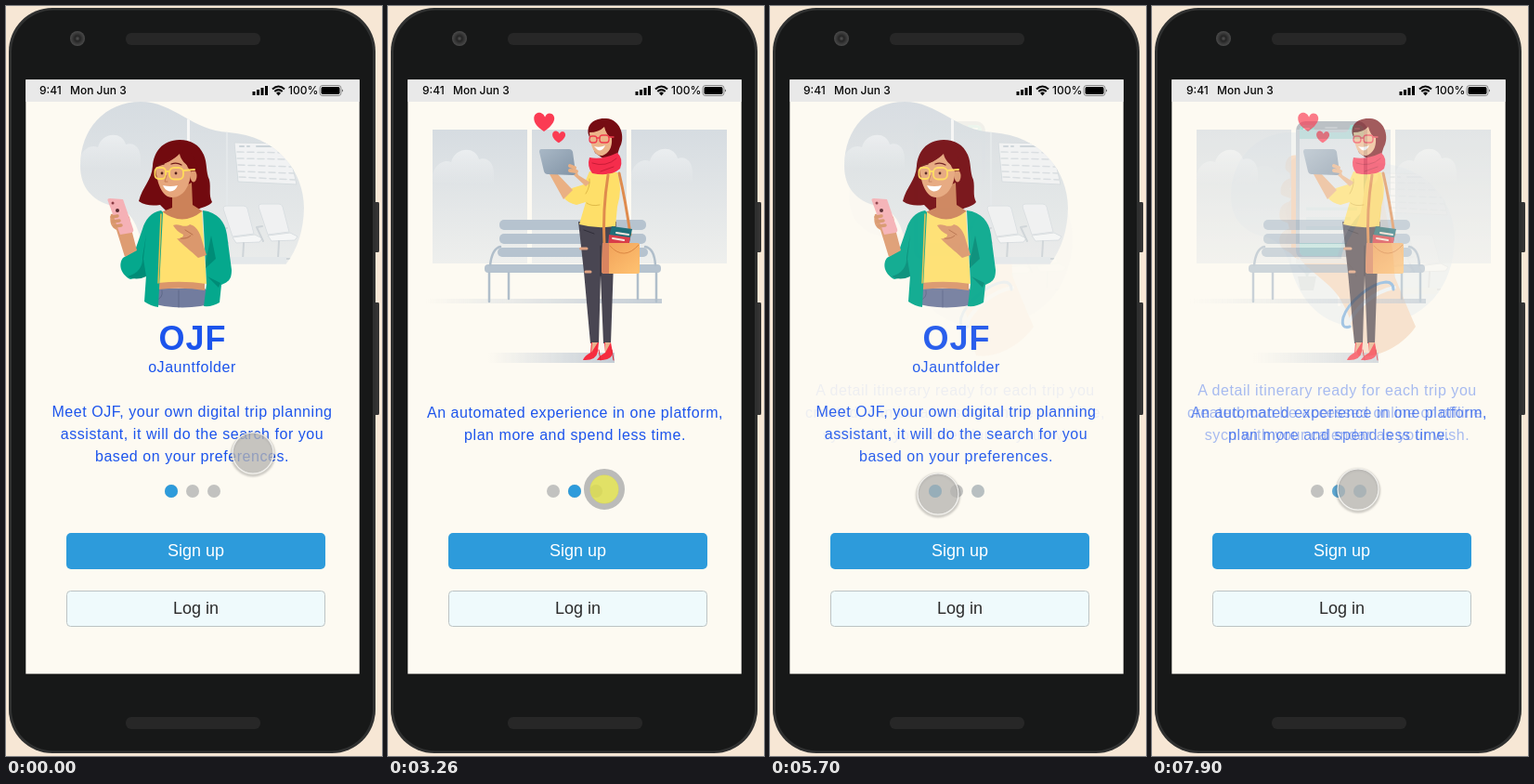
These frames come from a looping animation (405x807 px, 8 s). An HTML page:

```html
<!DOCTYPE html>
<html lang="en">
<head>
<meta charset="utf-8">
<title>Trip planner onboarding</title>
<style>
html, body { margin: 0; width: 100%; height: 100%; overflow: hidden; background: #f7e7d5; }
svg { display: block; width: 100%; height: 100%; }
text { font-family: "Liberation Sans", Arial, sans-serif; }
.copy { font-size: 16px; letter-spacing: .55px; fill: #1c54ec; text-anchor: middle; }
.title { font-size: 36px; font-weight: 700; letter-spacing: 1px; }
.label { font-size: 18px; text-anchor: middle; }
.status text { font: 500 12px Inter, "Liberation Sans", sans-serif; fill: #080808; }
.line { fill: none; stroke-linecap: round; stroke-linejoin: round; }
#two, #three, #press { opacity: 0; }
.shade { fill: none; stroke: rgba(0,0,0,.25); stroke-width: 2.5px; filter: blur(1px); }
</style>
</head>
<body>
<svg viewBox="0 0 405 807" preserveAspectRatio="none">
<defs>
  <linearGradient id="sky" x2="0" y2="1">
    <stop stop-color="#d6dce1"/><stop offset="1" stop-color="#eeefed"/>
  </linearGradient>
  <linearGradient id="cloud" x2="0" y2="1">
    <stop stop-color="#ebeef0"/><stop offset="1" stop-color="#eceeef" stop-opacity="0"/>
  </linearGradient>
  <linearGradient id="floor">
    <stop stop-color="#c9d1d9" stop-opacity="0"/><stop offset="1" stop-color="#c3ccd5"/>
  </linearGradient>
  <linearGradient id="bag" x2="1" y2="1">
    <stop stop-color="#f0a058"/><stop offset="1" stop-color="#ffc271"/>
  </linearGradient>
  <linearGradient id="slate" x2="1" y2="1">
    <stop stop-color="#a9b8c6"/><stop offset="1" stop-color="#8294a6"/>
  </linearGradient>
  <path id="blob" d="M80 172C80 132 107 103 145 103C181 103 200 134 240 136C292 140 321 178 321 217C320 270 290 307 230 313C185 315 160 292 147 257C141 235 135 219 115 215C93 210 80 195 80 172Z"/>
  <clipPath id="blobClip"><use href="#blob"/></clipPath>
  <clipPath id="above"><path d="M70 95H330V278H70Z"/></clipPath>
  <path id="puff" d="M0 40C-2 24 10 14 20 18C24 2 46 0 50 15C60 12 66 20 66 30L66 42Z"/>
  <path id="heart" d="M0 9C-15 0-10-11-3-9Q0-8 1-5Q3-10 8-8C13-4 9 3 0 9Z" fill="#fb3b53"/>
  <g id="chair">
    <path d="M0 3Q0 0 3 0L22 0Q25 0 26 3L33 30L10 33Z" fill="#f0f1f2" stroke="#dadfe2"/>
    <path d="M10 34L34 31L42 35L39 39L14 40Z" fill="#f5f6f6" stroke="#d8dde0"/>
    <path class="line" d="M4 24L-2 25L5 40M22 40L21 59M16 59H36" stroke="#ced4d8" stroke-width="2"/>
  </g>
  <g id="hall" clip-path="url(#blobClip)">
    <use href="#puff" x="79" y="134" fill="url(#cloud)"/>
    <path d="M195 100H198V290H195Z" fill="#f7f7f6"/>
    <path d="M237 100H239V250H237Z" fill="#e4e8ea"/>
    <path d="M246 147L303 148L313 192L250 189Z" fill="#f1f2f3"/>
    <path class="line" d="M249 157L305 158M249 164L307 165M250 171L308 173M250 178L310 180M251 184L311 187" stroke="#d8dde0" stroke-width="1.500" stroke-dasharray="7 4"/>
    <path class="line" d="M252 151H256M260 151H262M270 151H288" stroke="#ccd4d9" stroke-width="2"/>
    <path d="M246 147L303 148L313 192L250 189Z" fill="none" stroke="#d6dcdf"/>
    <use href="#chair" x="234" y="215"/>
    <use href="#chair" x="272" y="213"/>
    <path d="M236 270H302V277H236Z" fill="#e4e8ea"/>
  </g>
  <radialGradient id="lens"><stop stop-color="#555"/><stop offset=".35" stop-color="#242424"/><stop offset="1" stop-color="#4b4b4b"/></radialGradient>
</defs>

<!-- phone -->
<rect width="405" height="807" fill="#f7e7d5"/>
<path d="M396 211h5q1 0 1 2v50q0 2-1 2h-5zM396 319h5q1 0 1 2v117q0 2-1 2h-5z" fill="#333"/>
<rect x="3" y="2" width="395" height="802" rx="47" fill="#2f3030"/>
<rect x="6" y="4.500" width="389" height="797" rx="45" fill="#171818"/>
<g fill="#272727"><rect x="129" y="29" width="145" height="13" rx="6"/><rect x="129" y="765" width="145" height="13" rx="6"/></g>
<circle cx="77" cy="35" r="8" fill="url(#lens)"/>
<rect x="21.300" y="79.300" width="359.400" height="639.300" fill="#fdfaf2"/>
<rect x="21.300" y="79.300" width="359.400" height="23.700" fill="#e9e9e9"/>

<g class="status" id="status">
  <text x="36" y="95">9:41</text><text x="69" y="95">Mon Jun 3</text><text x="304" y="95">100%</text>
  <path d="M265.500 92h3v4h-3zM270 90h3v6h-3zM274.500 88h3v8h-3zM279 86h3v10h-3z"/>
  <g class="line" stroke="#080808" stroke-width="2.1" style="stroke-linecap:butt"><path d="M287 89.500Q293.500 83.500 300 89.500M289.300 92Q293.500 88.300 297.700 92"/></g>
  <path d="M291 93.700Q293.500 91.500 296 93.700L293.500 96.500Z"/>
  <rect x="338" y="85.500" width="23" height="11" rx="3" fill="none" stroke="#888"/>
  <rect x="339.500" y="87" width="20" height="8" rx="1.700"/><path d="M362 89.500q1.500 1.500 0 3z"/>
</g>

<!-- itinerary -->
<g id="three">
  <g transform="translate(5 33)"><use href="#blob" fill="#e1e9ef"/><use href="#hall"/></g>
  <path d="M157 291H177L174 306H160Z" fill="#cbd4da"/>
  <path class="line" d="M167 290V277M167 288L159 280M167 288L175 281" stroke="#c6d4da" stroke-width="3"/>
  <path class="line" d="M155 165Q148 164 148 174L156 180M154 189Q143 190 143 200L157 205M153 214Q140 215 142 227L155 232M152 243Q138 246 143 257L160 267" stroke="#edb68b" stroke-width="9"/>
  <path d="M148 168L158 160V273Q146 267 143 253L148 240L143 220L150 207Z" fill="#e8ab80"/>
  <rect x="155" y="124" width="77" height="149" rx="10" fill="#53667f"/>
  <rect x="159" y="128" width="69" height="141" rx="6" fill="#fcfcff"/>
  <path d="M159 143V134Q159 128 165 128H222Q228 128 228 134V143ZM159 255H228V263Q228 269 222 269H165Q159 269 159 263Z" fill="#06bda8"/>
  <path d="M173 127H214Q212 136 207 136H180Q175 136 173 127Z" fill="#53667f"/>
  <path class="line" d="M187 131H199" stroke="#8798ab" stroke-width="1.500"/>
  <path class="line" d="M164 132H169M219 132H223" stroke="#d9fffa" stroke-width="2"/>
  <path d="M166 216.500H221V220H166ZM166 227H214V230.500H166ZM166 237H221V241H166Z" fill="#cdebed"/>
  <path d="M226 222Q209 237 199 272H219Z" fill="#385c72" opacity=".55"/>
  <path d="M232 184C234 173 247 173 248 190C248 218 261 250 261 290Q273 320 284 345C270 366 242 380 222 376C216 358 218 343 207 323C196 299 176 292 159 272H204C205 256 220 245 225 221C229 205 227 196 232 184Z" fill="#efbd94"/>
  <path d="M234 179Q240 172 243 179Q245 187 239 192Q233 191 234 179Z" fill="#f8d8bf"/>
  <path class="line" d="M247 216Q245 239 232 254M205 272Q218 281 220 291" stroke="#d79a70"/>
  <path class="line" d="M210 346C217 325 240 307 261 303" stroke="#dce9f5" stroke-width="4"/>
  <path class="line" d="M213 345Q203 348 206 335C211 319 236 298 252 297Q260 297 260 305" stroke="#1470cb" stroke-width="3"/>
  <g class="copy">
    <text x="199.500" y="419">A detail itinerary ready for each trip you</text>
    <text x="199.500" y="443">created, can be accessed online or offline,</text>
    <text x="199.500" y="467">sycn with your calendar as your wish.</text>
  </g>
</g>

<!-- platform -->
<g id="two">
  <path d="M48 133H150V277H48ZM155 133H257V277H155ZM262 133H365V277H262Z" fill="url(#sky)"/>
  <use href="#puff" x="48" y="150" fill="url(#cloud)"/><use href="#puff" x="262" y="149" fill="url(#cloud)"/>
  <path d="M40 315H295V320H40Z" fill="url(#floor)"/><path d="M108 373H244V384H108Z" fill="url(#floor)"/>
  <g fill="#b6c3cf">
    <rect x="120" y="230" width="158" height="11" rx="5"/><rect x="120" y="245" width="158" height="11" rx="5"/>
    <rect x="118" y="260" width="162" height="10" rx="5"/><rect x="104" y="278" width="190" height="9" rx="4"/>
  </g>
  <path class="line" d="M110 279Q112 261 121 259M288 279Q287 261 277 259M109 287V318M130 287V315M269 287V315M289 287V318" stroke="#b0beca" stroke-width="2.500"/>
  <use href="#heart" transform="translate(168 125) scale(1.100)"/><use href="#heart" transform="translate(184 141) scale(.7)"/>
  <path d="M205 232H246L243 276L240 363H232L229 290L227 363H218L211 286Z" fill="#494652"/>
  <path class="line" d="M229 290L229 258M222 245L211 241" stroke="#302e39"/>
  <path class="line" d="M207.500 261H214M213 286H218" stroke="#dfa282" stroke-width="3"/>
  <path d="M219 362H227L226 372Q224 382 210 381Q212 376 218 373ZM233 362H240L242 373Q241 382 225 381Q228 376 234 373Z" fill="#f62c3f"/>
  <path d="M220 362H226L219 373ZM234 362H240L234 373Z" fill="#e9b18d"/>
  <path class="line" d="M227 370L229 381M241 370L243 381" stroke="#d92535"/>
  <path d="M217 178L247 179Q253 196 247 216L245 237Q224 240 206 235L213 211L203 214Q194 212 190 207L198 196L211 192Z" fill="#fedf69"/>
  <path d="M189 208L174 181L180 178L199 198ZM213 194L199 181L196 170L201 172L205 182L218 190Z" fill="#eab083"/>
  <path d="M165 154L195 154Q198 154 199 157L202 179Q202 182 199 182L172 181Q169 181 168 178L163 157Q163 154 165 154Z" fill="url(#slate)"/>
  <path class="line" d="M196 172L201 174M196 177L203 178" stroke="#eab083" stroke-width="4"/>
  <path class="line" d="M213 202Q218 194 217 186M214 212Q219 216 228 214" stroke="#e0ba48"/>
  <path d="M235 121C220 120 212 130 217 141L223 158L239 169C248 166 247 156 251 149C255 139 250 122 235 121Z" fill="#760c13"/>
  <path d="M217 136Q227 136 233 130Q235 139 241 142Q242 157 231 161Q219 162 217 136Z" fill="#ecb489"/>
  <g class="line" stroke="#f13b4c" stroke-width="1.300"><rect x="217" y="140" width="8" height="7" rx="3"/><rect x="228" y="139" width="10" height="8" rx="3"/><path d="M225 142H228M238 141H243"/></g>
  <path d="M222 151Q228 153 234 150Q231 157 226 155Z" fill="#fff"/>
  <path d="M217 163Q230 166 247 158Q254 164 250 175Q240 184 220 180Q214 173 217 163Z" fill="#f52d4c"/>
  <path class="line" d="M220 169Q235 174 246 164M229 178L243 173" stroke="#c91c37"/>
  <path class="line" d="M237 182Q231 220 233 256M249 180Q256 210 261 246" stroke="#df8b4d" stroke-width="3"/>
  <path d="M241 237L263 240L259 259L236 256Z" fill="#1f6f79"/><path d="M238 246L261 249L259 260L237 259Z" fill="#d93d49"/>
  <path class="line" d="M246 244L259 246M242 250L254 252" stroke="#f6e5dd" stroke-width="2"/>
  <path d="M231 255H269Q271 255 271 258V286Q271 288 268 288H233Q230 288 230 285Z" fill="url(#bag)"/>
  <path d="M231 255H238V288H233Q230 288 230 285Z" fill="#d98460"/>
  <path class="line" d="M239 258Q254 275 270 257" stroke="#db8743"/>
  <g class="copy">
    <text x="201.500" y="443">An automated experience in one platform,</text>
    <text x="201.500" y="467">plan more and spend less time.</text>
  </g>
</g>

<!-- welcome -->
<g id="one">
  <g clip-path="url(#above)"><use href="#blob" fill="url(#sky)"/><use href="#hall"/></g>
  <path d="M187 144C168 144 159 158 158 172C157 188 147 194 143 210C150 215 158 215 166 214L172 220L205 220C211 216 218 216 222 211C218 203 221 196 219 187C215 178 217 169 213 160C208 149 199 144 187 144Z" fill="#720a0f"/>
  <path d="M179 200L200 190L201 214L212 221L190 238L167 222L179 217Z" fill="#cc8259"/>
  <path d="M161 304H214L230 318Q190 331 150 318Z" fill="#727c9e"/>
  <path class="line" d="M186 306V324M168 306Q170 315 160 317" stroke="#5e6889"/>
  <path d="M165 296H214V306Q190 302 164 305Z" fill="#da966b"/>
  <path d="M168 221Q190 238 211 221L216 299Q190 295 164 298Z" fill="#ffe06f"/>
  <path d="M167 220C156 222 150 230 147 240L139 263L126 271C120 279 125 290 134 294L151 290L149 318Q156 323 164 324L169 222Z" fill="#05a88d"/>
  <path d="M212 220C228 222 236 232 238 246L243 284C243 296 238 297 232 300L230 319Q222 324 213 323L216 299Z" fill="#05a88d"/>
  <path d="M151 246L148 272L151 291Q140 296 131 291Q148 286 147 270ZM221 247L226 272L215 282L215 276ZM231 298L217 291L229 303Z" fill="#008c77"/>
  <path class="line" d="M167 224L164 298" stroke="#e2bd4c" stroke-width="1.500"/>
  <path d="M113 224C111 232 113 238 119 241L128 270L141 263L135 240L133 227L125 222Z" fill="#de9c72"/>
  <path d="M109.500 209Q109 207 112 207L126 208L137 240Q138 243 135 244L123 246Z" fill="#f5b1b6"/>
  <circle cx="120" cy="220" r="2" fill="#57272e"/><circle cx="115" cy="212" r="1.500" fill="#8b3c45"/>
  <path class="line" d="M114 227L120 226M115 232L122 231M117 237L124 236" stroke="#d8966c" stroke-width="3.500"/>
  <path d="M180 236C186 233 192 240 198 235C204 236 209 243 211 252L216 268L207 271C200 264 190 257 184 250C188 251 191 249 191 246Q184 243 180 236Z" fill="#db986d"/>
  <path class="line" d="M188 250Q195 251 199 247M193 241L201 246" stroke="#b8714b"/>
  <path d="M161 172C162 190 168 206 179 206C191 206 199 194 200 174C193 171 188 165 187 159C180 166 171 170 161 172Z" fill="#e6a67c"/>
  <ellipse cx="202" cy="183" rx="3.500" ry="6.500" fill="#e09d73"/>
  <path d="M190 155Q179 168 158 175Q161 155 178 148Q200 146 207 177L199 178Q193 172 190 155Z" fill="#720a0f"/>
  <g class="line" stroke="#ffda5c" stroke-width="1.900"><rect x="160.500" y="174" width="11.500" height="12" rx="4"/><rect x="176" y="174" width="15" height="12.500" rx="5"/><path d="M172 178H176M191 177L203 176"/></g>
  <circle cx="168" cy="180" r="1.400" fill="#512019"/><circle cx="183" cy="180" r="1.400" fill="#512019"/>
  <path class="line" d="M163 171L170 170M178 170Q184 168 189 171" stroke="#6b1717" stroke-width="1.300"/>
  <path class="line" d="M173 182L171 189H174" stroke="#c67c57"/>
  <path d="M169 193Q177 195 185 193Q182 200 176 199.500Q171 198 169 193Z" fill="#fff"/>
  <g class="copy">
    <text class="title" x="201" y="370">OJF</text><text x="200.500" y="394">oJauntfolder</text>
    <text x="200.500" y="442">Meet OJF, your own digital trip planning</text>
    <text x="200.500" y="466">assistant, it will do the search for you</text>
    <text x="200.500" y="490">based on your preferences.</text>
  </g>
</g>

<g id="dots"></g>

<rect x="65" y="567" width="279" height="39" rx="5" fill="#2d9bdb"/>
<rect x="65.500" y="629.500" width="278" height="38" rx="4" fill="#effafc" stroke="#bcc3c4"/>
<text class="label" x="204.500" y="592" fill="#fff">Sign up</text>
<text class="label" x="204.500" y="654" fill="#2b2b2b">Log in</text>

<g id="cursor">
  <g id="rest"><circle class="shade" cy="1.500" r="22.500"/><circle r="22" fill="#b5b4b0" fill-opacity=".77" stroke="#f4f3f0" stroke-width="1.200"/></g>
  <g id="press"><circle r="18.500" fill="none" stroke="#bbbbb9" stroke-width="7"/><circle r="15.500" fill="#dcdc4e" fill-opacity=".85"/></g>
</g>
</svg>

<script>
const LOOP = 8000;
const $ = id => document.getElementById(id);

// steps: [time, value, easing towards the next step]
function play(el, steps, toFrame, easing) {
  const frames = steps.map(([t, v, ease]) => ({ offset: t / LOOP, easing: ease || easing, ...toFrame(v) }));
  const last = steps[steps.length - 1];
  if (last[0] < LOOP) frames.push({ offset: 1, ...toFrame(last[1]) });
  el.animate(frames, { duration: LOOP, iterations: Infinity });
}
const fade = opacity => ({ opacity });
const move = ([x, y]) => ({ transform: `translate(${x}px, ${y}px)` });

const shown = {
  one: [[0, 1], [1130, 1], [1640, 0], [5290, 0], [5790, 1], [6500, 1], [6920, 0]],
  two: [[0, 0], [1130, 0], [1640, 1], [3300, 1], [3820, 0], [6500, 0], [6920, 1],
        [7610, 1, 'ease-in'], [7900, .67, 'linear'], [8000, .5]],
  three: [[0, 0], [3300, 0], [3820, 1], [5290, 1], [5790, 0],
          [7610, 0, 'ease-in'], [7900, .38, 'linear'], [8000, .55]]
};

Object.keys(shown).forEach((id, i) => {
  const dot = fill => {
    const c = document.createElementNS('http://www.w3.org/2000/svg', 'circle');
    for (const [k, v] of Object.entries({ cx: 178 + 23 * i, cy: 522, r: 7, fill })) c.setAttribute(k, v);
    return $('dots').appendChild(c);
  };
  dot('#c2c2c0');
  const active = dot('#2d9bdb');
  for (const el of [$(id), active]) play(el, shown[id], fade, 'ease-in-out');
});

play($('cursor'), [
  [0, [266, 481]], [40, [266, 481]], [360, [197, 531]], [500, [197, 531]], [780, [199, 519]],
  [2520, [199, 519]], [2730, [233, 520]], [4190, [233, 520], 'linear'], [4240, [226, 521]],
  [4360, [180, 526]], [4480, [180, 526]], [4580, [181, 525]], [5710, [181, 525]],
  [5900, [201, 523]], [6840, [201, 523]], [7130, [222, 520]]
], move, 'ease-in-out');

const taps = [[1080, 1190], [3250, 3375], [5230, 5340], [6120, 6450], [7310, 7640]];
const down = [[0, 0], ...taps.flatMap(([a, b]) => [[a, 1], [b, 0]])];
play($('press'), down, fade, 'steps(1)');
play($('rest'), down, v => fade(1 - v), 'steps(1)');

play($('status'), [[0, 0], [1400, 1], [3560, 0], [6730, 1]], x => move([x, 0]), 'steps(1)');
</script>
</body>
</html>
```
